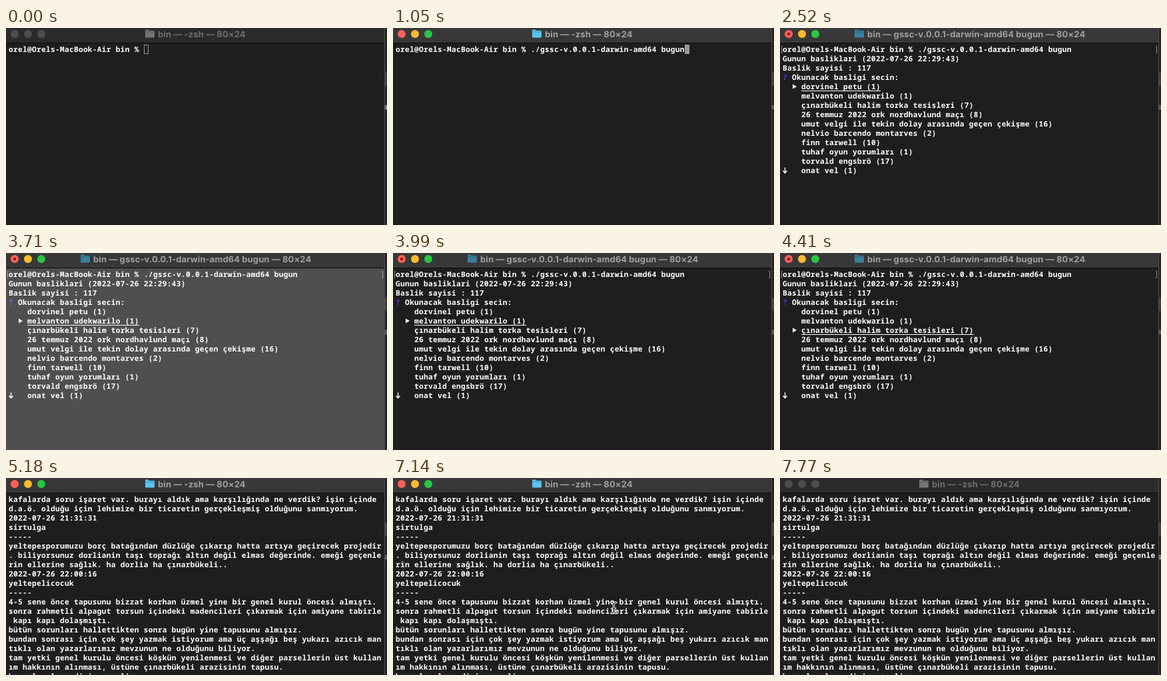
Recreate the animation shown at these times as an HTML page. Size 572x296 px, loop 7.84 s.

```html
<!DOCTYPE html>
<html lang="tr">
<head>
<meta charset="utf-8">
<title>Terminal</title>
<style>
  html, body { margin: 0; width: 100%; height: 100%; overflow: hidden; background: #1e1e1e; }
  svg { display: block; width: 572px; height: 296px; }
  text { white-space: pre; text-rendering: geometricPrecision; }
  .mono text {
    font: 600 11.2px "Noto Sans Mono", "DejaVu Sans Mono", monospace;
    letter-spacing: .28px;
    fill: #fff;
  }
  .title { font: 700 13px Inter, "Open Sans", sans-serif; letter-spacing: .1px; }
</style>
</head>
<body>
<svg id="stage" viewBox="0 0 572 296">
  <rect width="572" height="296" fill="#1e1e1e"/>
  <g id="side">
    <rect x="569" width="3" height="296" fill="#232323"/>
    <rect x="569" y="67" width="3" height="20" fill="#414141"/>
    <text id="sideText" x="567" y="122" font-family="Inter, sans-serif" font-size="11" font-weight="600">s</text>
  </g>
  <rect id="bar" width="569" height="22"/>
  <rect y="22" width="569" height="1" fill="#0c0c0c"/>
  <g id="lights">
    <circle cx="13" cy="9" r="6"/>
    <circle cx="33" cy="9" r="6"/>
    <circle cx="53" cy="9" r="6"/>
  </g>
  <circle id="dot" cx="13" cy="9" r="2" fill="#6e0d08"/>
  <g id="folder">
    <path d="M0 2.2Q0 1 1.2 1H4.6L6 2.4H12.8Q14 2.4 14 3.6V11.8Q14 13 12.8 13H1.2Q0 13 0 11.8Z"/>
    <path d="M0 4.4H14" stroke="#000" stroke-opacity=".25"/>
  </g>
  <text id="title" class="title" y="13.5"></text>

  <g id="shell" class="mono"></g>
  <g id="list" class="mono">
    <path id="pointer" d="M19 -7.5L25 -4L19 -.5Z" fill="#fff"/>
    <rect id="underline" x="32" height="1" fill="#fff"/>
    <path d="M7.5 209.5V217.5M4.5 214.5L7.5 218L10.5 214.5" fill="none" stroke="#fff" stroke-width="1.4"/>
  </g>
  <g id="page" class="mono"></g>

  <path id="brackets" d="M4 27.5H2.5V37.5H4M564 27.5H565.5V37.5H564" fill="none" stroke="#8a8a8a"/>
  <rect id="caret" width="6" height="13" stroke="#989898"/>
  <rect id="flash" y="23" width="569" height="273" fill="#fff"/>
  <path d="M568.5 0V296" stroke="#4e4e4e"/>
  <g id="beam" fill="none" stroke-linecap="round">
    <path d="M328 187Q331.5 187 331.5 190V200Q331.5 203 328 203M335 187Q331.5 187 331.5 190V200Q331.5 203 335 203M329.5 196H333.5" stroke="#fff" stroke-width="3"/>
    <path d="M328 187Q331.5 187 331.5 190V200Q331.5 203 328 203M335 187Q331.5 187 331.5 190V200Q331.5 203 335 203M329.5 196H333.5" stroke="#000"/>
  </g>
</svg>
<script>
const LOOP = 7840, CELL = 7, LINE = 14, LEFT = 4, BASE = 36, TICK = 70;
const TIME = {
  focus: 350, paste: 1050, enter: 2240, list: 2450, busy: 2520,
  moves: [3710, 4130], page: 5040, idle: 5110, settled: 5180, beam: 7140, blur: 7770
};

const PROMPT = 'orel@Orels-MacBook-Air bin % ';
const COMMAND = './gssc-v.0.0.1-darwin-amd64 bugun';
const ITEMS = [
  'dorvinel petu (1)',
  'melvanton udekwarilo (1)',
  'çınarbükeli halim torka tesisleri (7)',
  '26 temmuz 2022 ork nordhavlund maçı (8)',
  'umut velgi ile tekin dolay arasında geçen çekişme (16)',
  'nelvio barcendo montarves (2)',
  'finn tarwell (10)',
  'tuhaf oyun yorumları (1)',
  'torvald engsbrö (17)',
  'onat vel (1)'
];
const PAGE = [
  'kafalarda soru işaret var. burayı aldık ama karşılığında ne verdik? işin içinde',
  'd.a.ö. olduğu için lehimize bir ticaretin gerçekleşmiş olduğunu sanmıyorum.',
  '2022-07-26 21:31:31',
  'sirtulga',
  '-----',
  'yeltepesporumuzu borç batağından düzlüğe çıkarıp hatta artıya geçirecek projedir',
  '. biliyorsunuz dorlianin taşı toprağı altın değil elmas değerinde. emeği geçenle',
  'rin ellerine sağlık. ha dorlia ha çınarbükeli..',
  '2022-07-26 22:00:16',
  'yeltepelicocuk',
  '-----',
  '4-5 sene önce tapusunu bizzat korhan üzmel yine bir genel kurul öncesi almıştı.',
  'sonra rahmetli alpagut torsun içindeki madencileri çıkarmak için amiyane tabirle',
  ' kapı kapı dolaşmıştı.',
  'bütün sorunları hallettikten sonra bugün yine tapusunu almışız.',
  'bundan sonrası için çok şey yazmak istiyorum ama üç aşşağı beş yukarı azıcık man',
  'tıklı olan yazarlarımız mevzunun ne olduğunu biliyor.',
  'tam yetki genel kurulu öncesi köşkün yenilenmesi ve diğer parsellerin üst kullan',
  'ım hakkının alınması, üstüne çınarbükeli arazisinin tapusu.',
  'hayırlı olsun diyip geçelim.'
];

const $ = id => document.getElementById(id);
const set = (id, attrs) => {
  for (const k in attrs) $(id).setAttribute(k, attrs[k]);
};
const show = (id, on) => { $(id).style.display = on ? '' : 'none'; };

function write(group, row, col, text, fill) {
  const el = document.createElementNS('http://www.w3.org/2000/svg', 'text');
  // Leading blanks become an offset so they never collapse.
  const pad = text.length - text.trimStart().length;
  el.setAttribute('x', LEFT + (col + pad) * CELL);
  el.setAttribute('y', BASE + row * LINE);
  if (fill) el.style.fill = fill;
  el.textContent = text.trimStart();
  $(group).append(el);
  return el;
}

write('shell', 0, 0, PROMPT.trimEnd());
const command = write('shell', 0, PROMPT.length, COMMAND);
write('list', 1, 0, 'Gunun basliklari (2022-07-26 22:29:43)');
write('list', 2, 0, 'Baslik sayisi : 117');
write('list', 3, 0, '?', '#4b3fd8');
write('list', 3, 2, 'Okunacak basligi secin:');
ITEMS.forEach((item, i) => write('list', 4 + i, 4, item));
PAGE.forEach((line, i) => write('page', i, 0, line));

function drawWindow(t) {
  const active = t >= TIME.focus && t < TIME.blur;
  const busy = t >= TIME.busy && t < TIME.idle;
  const dirty = t >= TIME.busy && t < TIME.settled;
  const colors = active ? ['#ff5f57', '#febc2e', '#28c840'] : Array(3).fill('#4d4d4d');
  [...$('lights').children].forEach((c, i) => c.setAttribute('fill', colors[i]));
  show('dot', dirty);
  set('bar', { fill: active ? '#383838' : '#2b2b2b' });
  set('sideText', { fill: active ? '#8a8a8a' : '#d0d0d0' });
  set('folder', {
    transform: `translate(${busy ? 112 : 209} 1.5)`,
    fill: !active ? '#747474' : dirty ? '#3b7f9b' : '#5ac3f2'
  });
  set('title', { x: busy ? 131 : 228, fill: active ? '#a0a0a0' : '#6e6e6e' });
  $('title').textContent = `bin — ${busy ? COMMAND.slice(2) : '-zsh'} — 80×24`;
}

function drawCaret(t) {
  const entered = t >= TIME.enter;
  const col = entered ? 0 : PROMPT.length + (t >= TIME.paste ? COMMAND.length : 0);
  show('caret', t < TIME.list);
  set('caret', {
    x: LEFT + col * CELL + .5,
    y: 25.5 + (entered ? LINE : 0),
    fill: t < TIME.focus ? 'none' : '#989898'
  });
}

function drawList(t) {
  const moved = TIME.moves.filter(m => t >= m);
  const pick = moved.length;
  const y = BASE + (4 + pick) * LINE;
  set('pointer', { transform: `translate(0 ${y})` });
  set('underline', { y: y + 2, width: ITEMS[pick].length * CELL });
  // Visual bell fades in four even steps after each move.
  const age = pick ? Math.floor((t - moved[pick - 1]) / TICK) : 4;
  set('flash', { opacity: .22 * Math.max(0, 1 - age / 4) });
}

function draw(t) {
  drawWindow(t);
  drawCaret(t);
  drawList(t);
  command.style.display = t >= TIME.paste ? '' : 'none';
  show('shell', t < TIME.page);
  show('brackets', t >= TIME.enter && t < TIME.page);
  show('list', t >= TIME.list && t < TIME.page);
  show('page', t >= TIME.page);
  show('beam', t >= TIME.beam && t < TIME.beam + TICK);
}

const start = performance.now();
function tick() {
  draw((performance.now() - start) % LOOP);
  requestAnimationFrame(tick);
}
tick();
</script>
</body>
</html>
```
